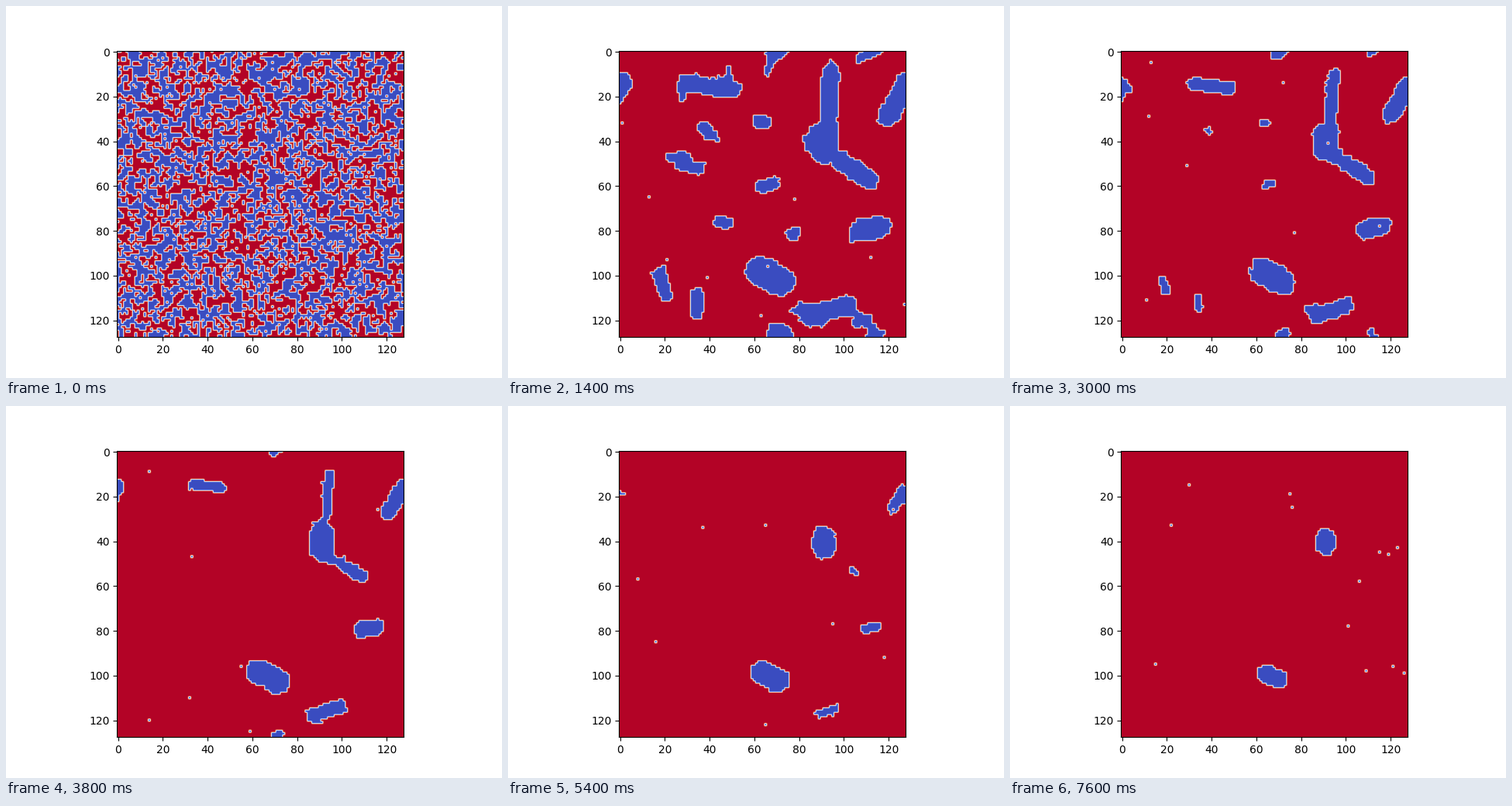
These frames come from a looping animation (640x480 px, 7700 ms). A matplotlib script:

```python
import matplotlib.pyplot as plt
import numpy as np
from matplotlib.animation import FuncAnimation

N = 128
FRAMES = 77
TEMP = 1.06

# Main domains: both ends of the spine and the starting radius
MAIN = [
    ((129, 13), (119, 30), 5.2),
    ((94, 8), (93, 34), 4.4),
    ((91, 37), (91, 44), 6.8),
    ((97, 48), (112, 58), 4.7),
    ((107, 80), (117, 78), 5.2),
    ((62, 98), (72, 103), 6.8),
    ((84, 119), (102, 113), 5.0),
    ((28, 14), (52, 17), 4.5),
]

Y, X = np.mgrid[:N, :N]


def wrap(d):
    return (d + N / 2) % N - N / 2


def small_domains(rng, count=16):
    """Short spines at random places and angles."""
    for _ in range(count):
        x, y = rng.uniform(0, N, 2)
        angle, half = rng.uniform(0, np.pi), rng.uniform(0, 6)
        dx, dy = half * np.cos(angle), half * np.sin(angle)
        yield (x - dx, y - dy), (x + dx, y + dy), rng.uniform(3, 4.3)


def domain_mask(domains, t):
    """Cells inside the domains, whose areas shrink at a steady rate."""
    mask = np.zeros((N, N), bool)
    for (x0, y0), (x1, y1), radius in domains:
        k = np.sqrt(max(0, 1 - t / (2.5 * radius**2)))
        ux, uy = k * (x1 - x0) / 2, k * (y1 - y0) / 2
        dx, dy = wrap(X - (x0 + x1) / 2), wrap(Y - (y0 + y1) / 2)
        along = np.clip((dx * ux + dy * uy) / (ux**2 + uy**2 + 1e-9), -1, 1)
        mask |= np.hypot(dx - along * ux, dy - along * uy) < k * radius
    return mask


def sweep(spins, field, rng):
    """One Metropolis sweep; the field only acts along domain walls."""
    for parity in (0, 1, 0, 1):
        near = sum(np.roll(spins, s, axis) for s in (-1, 1) for axis in (0, 1))
        local = near + np.where(abs(near) < 4, field, 0)
        chosen = ((X + Y) % 2 == parity) & (rng.random((N, N)) < 0.42)
        accept = rng.random((N, N)) < np.exp(-2 * spins * local / TEMP)
        spins = np.where(chosen & accept, -spins, spins)
    return spins


def simulate():
    rng = np.random.default_rng(7)
    domains = MAIN + list(small_domains(rng))
    spins = rng.choice([-1, 1], (N, N))
    states = []
    for t in range(FRAMES):
        field = np.where(domain_mask(domains, t), -1.0, 0.6) if t else 0
        spins = sweep(spins, field, rng)
        states.append(spins)
    return states


states = simulate()
fig, ax = plt.subplots(figsize=(6.4, 4.8), dpi=100)
image = ax.imshow(states[0], cmap="coolwarm", vmin=-1, vmax=1)


def update(i):
    image.set_data(states[i])
    return [image]


anim = FuncAnimation(fig, update, frames=FRAMES, init_func=lambda: update(0),
                     interval=100, repeat=True, repeat_delay=0)
plt.show()
```
